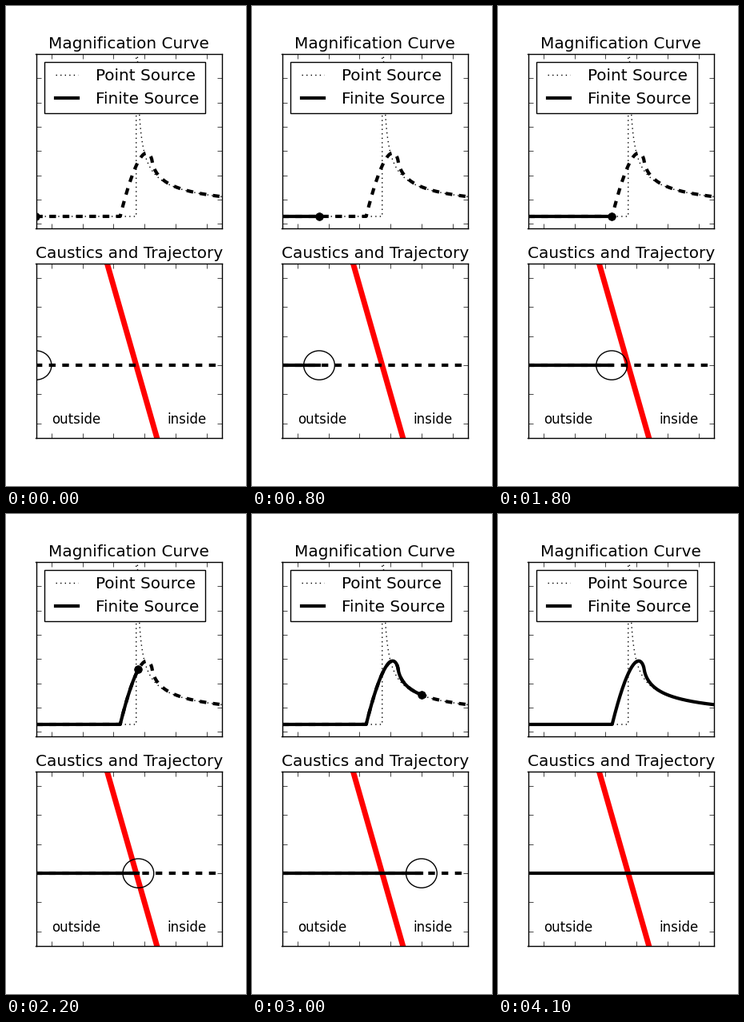
Write a matplotlib script that moves like this. It is 300 px wide and 600 px high and loops after 4.2 s.

```python
import numpy as np
import matplotlib.pyplot as plt
from matplotlib.animation import FuncAnimation
from matplotlib.patches import Circle

plt.style.use("classic")
plt.rcParams.update({
    "font.family": "DejaVu Sans",
    "figure.dpi": 100,
    "savefig.dpi": 100,
    "figure.facecolor": "white",
})

FRAMES = 42
STEPS = 40            # moves needed to cross the whole panel
FINE = 10             # curve samples per move
X_MIN, X_MAX = -3.5, 2.5
TRACK_Y = 1.0
RADIUS = 0.5
TILT = np.radians(15)
BASE = 0.3            # magnification outside the caustic
PEAK = 1.88           # strength of the fold
X_CROSS = -TRACK_Y * np.tan(TILT)


def disc_mean(z):
    """Mean of 1/sqrt(distance to the fold) over a unit disc centred at z."""
    if z <= -1:
        return 0.0
    n = 600
    mid = (np.arange(n) + 0.5) / n
    if z < 1:
        t = mid * np.pi / 2
        f = (1 + z) * np.cos(t)**2 * np.sqrt(1 - z + (1 + z) * np.sin(t)**2)
        return 2 * f.mean()
    t = (mid - 0.5) * np.pi
    return 2 * np.mean(np.cos(t)**2 / np.sqrt(z + np.sin(t)))


def fold_distance(x):
    return (x - X_CROSS) * np.cos(TILT) / RADIUS


xs = np.linspace(X_MIN, X_MAX, STEPS * FINE + 1)
finite = np.array([BASE + PEAK * disc_mean(z) for z in fold_distance(xs)])

inside = X_CROSS + np.linspace(0.17, np.sqrt(X_MAX - X_CROSS), 300)**2
point_x = np.concatenate([[X_MIN, X_CROSS, X_CROSS], inside])
point_y = np.concatenate([[BASE, BASE, 8.3],
                          BASE + PEAK / np.sqrt(fold_distance(inside))])

fig, (top, low) = plt.subplots(2, 1, figsize=(3, 6))
for ax in (top, low):
    ax.set_xlim(X_MIN, X_MAX)
    ax.set_xticks(range(-3, 3))
    ax.tick_params(labelbottom=False, labelleft=False)
top.set_ylim(-0.2, 7)
top.set_yticks(range(8))
low.set_ylim(-1.5, 4.5)
low.set_yticks(range(-1, 5))

# magnification panel
top.set_title("Magnification Curve")
top.plot(point_x, point_y, "k:", lw=1, label="Point Source")
dashed_curve, = top.plot(xs, finite, "k--", lw=3)
solid_curve, = top.plot([], [], "k-", lw=3, label="Finite Source")
dot, = top.plot([], [], "ko", ms=7)
top.legend(loc="upper left", framealpha=1)

# caustic panel
low.set_title("Caustics and Trajectory")
edge = np.array([-2.0, 5.0])
low.plot(-edge * np.tan(TILT), edge, "r-", lw=5)
dashed_track, = low.plot([X_MIN, X_MAX], [TRACK_Y] * 2, "k--", lw=3)
solid_track, = low.plot([], [], "k-", lw=3)
disc = low.add_patch(Circle((X_MIN, TRACK_Y), RADIUS, fill=False, lw=1, zorder=3))
low.text(-3, -1, "outside", fontsize=12)
low.text(2, -1, "inside", fontsize=12, ha="right")


def draw(i):
    last = min(i, STEPS) * FINE
    x = xs[last]
    moving = i <= STEPS
    solid_curve.set_data(xs[:last + 1], finite[:last + 1])
    if last:
        solid_track.set_data([X_MIN, x], [TRACK_Y] * 2)
    else:
        solid_track.set_data([], [])
    dot.set_data([x], [finite[last]])
    disc.center = (x, TRACK_Y)
    # the closing frame shows only the finished lines
    for part in (dot, disc, dashed_curve, dashed_track):
        part.set_visible(moving)
    return solid_curve, solid_track, dot, disc


anim = FuncAnimation(fig, draw, frames=FRAMES, interval=100, repeat=True)
plt.show()
```
